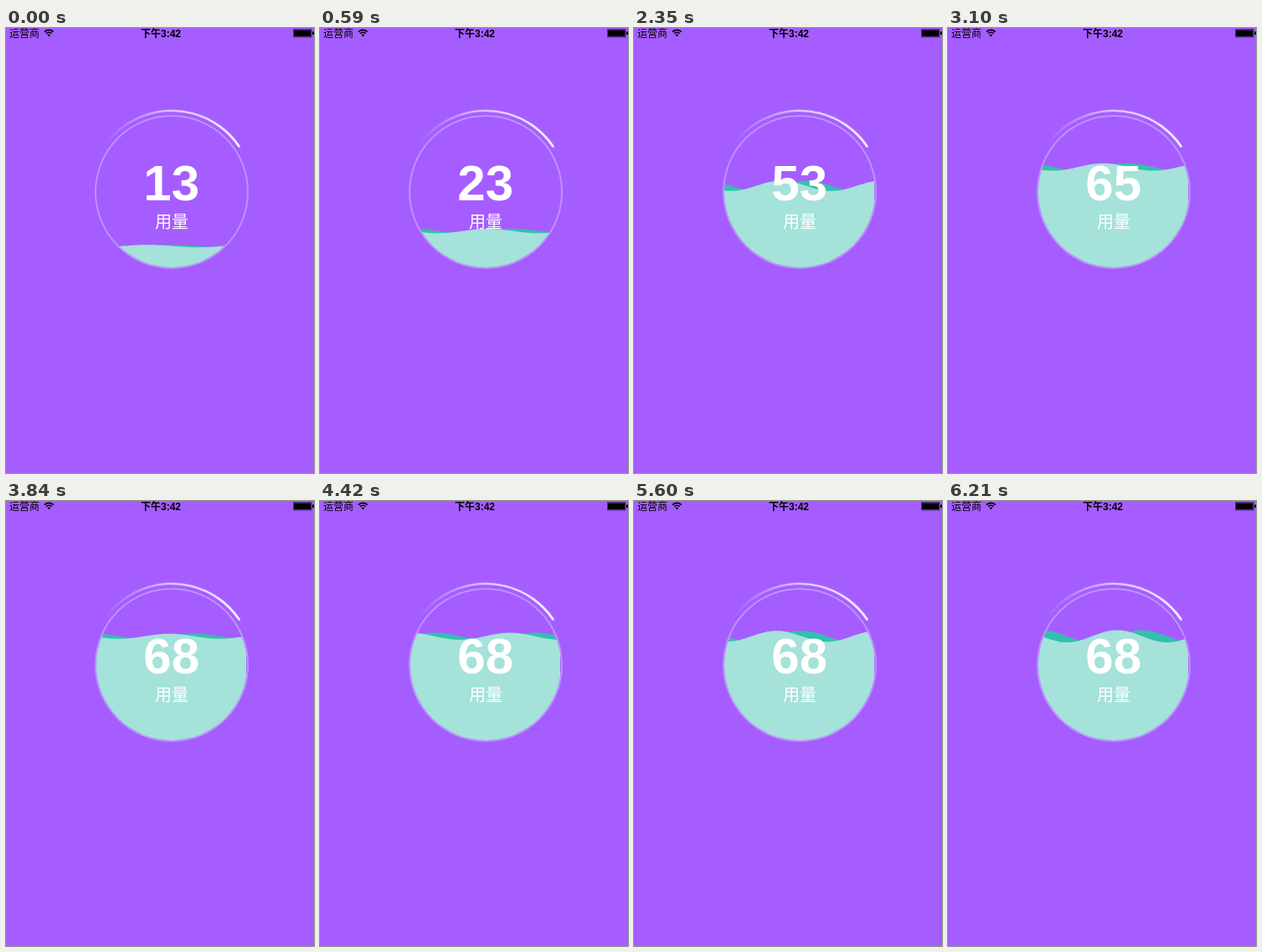
An HTML page with a canvas that plays this animation: 368x532 px, repeating every 6.31 s.

```html
<!DOCTYPE html>
<html lang="zh-CN">
<head>
<meta charset="utf-8">
<style>
  html, body { margin: 0; width: 100%; height: 100%; overflow: hidden; background: #a55dff; }
  canvas { display: block; }
</style>
</head>
<body>
<canvas id="stage" width="368" height="532"></canvas>
<script>
const ctx = document.getElementById('stage').getContext('2d');
const LOOP = 6310, STEP = 147.6, LAST_STEP = 42;
const CX = 198, CY = 196, WAVELENGTH = 120;
const WATER_LEFT = 108, WATER_RIGHT = 287;
const FONTS = '"Liberation Sans", "Noto Sans CJK SC", "Noto Sans CJK", sans-serif';
const CJK_FONTS = '"Noto Sans CJK SC", "Noto Sans CJK", sans-serif';

function text(str, x, y, font, color, align = 'center') {
  ctx.font = font;
  ctx.fillStyle = color;
  ctx.textAlign = align;
  ctx.fillText(str, x, y);
}

function arc(x, y, r, from, to, width, style) {
  ctx.beginPath();
  ctx.arc(x, y, r, from, to);
  ctx.lineWidth = width;
  ctx.strokeStyle = style;
  ctx.stroke();
}

function wave(crest, level, amp, color) {
  ctx.beginPath();
  ctx.moveTo(WATER_LEFT, 290);
  for (let x = WATER_LEFT; x <= WATER_RIGHT; x++) {
    ctx.lineTo(x, level - amp * Math.cos((x - crest) * 2 * Math.PI / WAVELENGTH));
  }
  ctx.lineTo(WATER_RIGHT, 290);
  ctx.fillStyle = color;
  ctx.fill();
}

function statusBar() {
  text('运营商', 4, 10.5, `300 12px ${CJK_FONTS}`, '#000', 'left');
  text('下午3:42', 185, 10.5, `bold 12px ${FONTS}`, '#000');
  const up = -Math.PI / 2;
  arc(51.3, 10, 7.6, up - 0.78, up + 0.78, 1.7, '#000');
  arc(51.3, 10, 4.7, up - 0.78, up + 0.78, 1.7, '#000');
  ctx.beginPath();
  ctx.moveTo(51.3, 10.3);
  ctx.arc(51.3, 10.3, 2.6, up - 0.78, up + 0.78);
  ctx.fillStyle = '#000';
  ctx.fill();
  ctx.lineWidth = 1;
  ctx.strokeStyle = 'rgba(0,0,0,.5)';
  ctx.strokeRect(343.5, 1.5, 21.5, 9.5);
  ctx.fillRect(344, 2.4, 20.5, 7.8);
  ctx.fillRect(366, 4.4, 2, 3.6);
}

function gauge(step) {
  const percent = Math.min(68, 13 + 2.5 * step);
  const level = 284.1 - 1.8 * percent;
  // The swell grows and shrinks linearly between 1.5 and 7.5 px.
  const amp = 7.5 - Math.abs((3.29 * step) % 12 - 6);
  const crest = 169 - 22.07 * step;

  ctx.save();
  ctx.beginPath();
  ctx.arc(CX, CY, 90, 0, 2 * Math.PI);
  ctx.clip();
  wave(crest + WAVELENGTH / 4, level, amp, '#34bfae');
  wave(crest, level, amp, '#a5e2da');
  ctx.restore();

  arc(CX, CY, 91, 0, 2 * Math.PI, 2, 'rgba(255,255,255,.32)');

  const fade = ctx.createLinearGradient(118, 0, 280, 0);
  fade.addColorStop(0, 'rgba(255,255,255,0)');
  fade.addColorStop(0.5, 'rgba(255,255,255,.55)');
  fade.addColorStop(1, 'rgba(255,255,255,.95)');
  ctx.save();
  ctx.lineCap = 'round';
  ctx.shadowColor = 'rgba(255,255,255,.5)';
  ctx.shadowBlur = 2;
  arc(CX, CY, 97.2, -2.52, -0.594, 2.2, fade);
  ctx.restore();

  text(Math.floor(percent), CX - 0.3, 206.3, `bold 60px ${FONTS}`, '#fff');
  text('用量', CX, 238.5, `300 20px ${CJK_FONTS}`, '#fff');
}

function draw(now) {
  const t = now % LOOP;
  ctx.fillStyle = '#a55dff';
  ctx.fillRect(0, 0, 368, 532);
  statusBar();
  gauge(Math.min(LAST_STEP, Math.floor((t + 12) / STEP)));
}

const start = performance.now();
(function tick() {
  draw(performance.now() - start);
  requestAnimationFrame(tick);
})();
</script>
</body>
</html>
```
